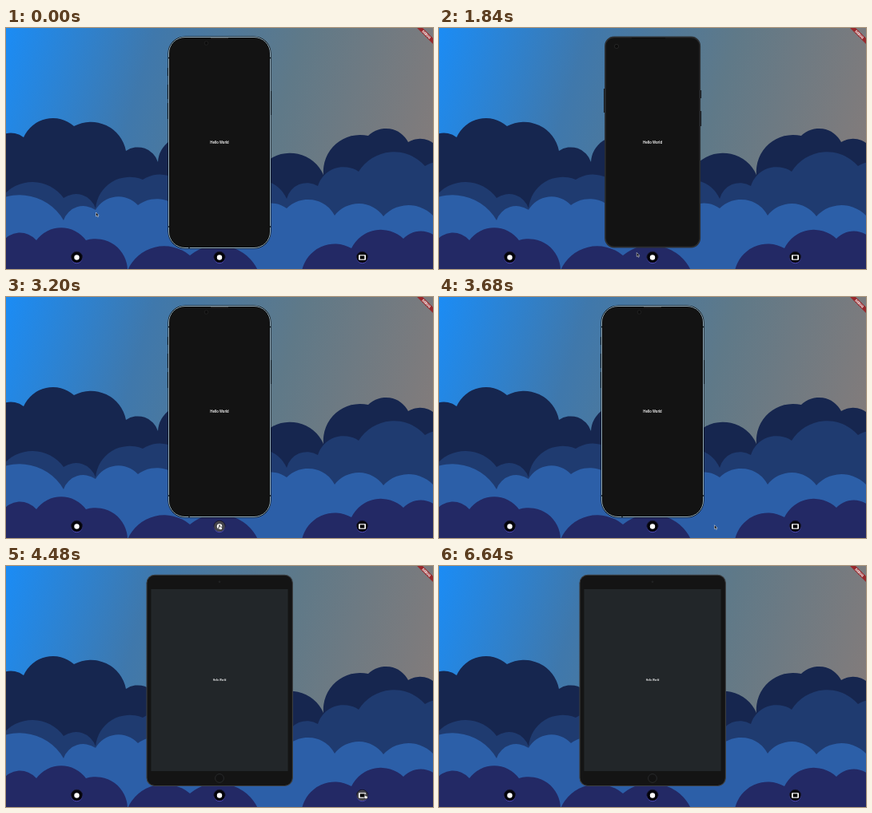
Recreate the animation shown at these times as an HTML page. Size 534 px wide and 302 px high, loop 7200 ms.

```html
<!DOCTYPE html>
<html lang="en">
<head>
<meta charset="utf-8">
<title>Device preview</title>
<style>
html, body { margin: 0; width: 100%; height: 100%; overflow: hidden; background: #232965; }
svg { display: block; width: 100vw; height: 100vh; }
text { font-family: Roboto, sans-serif; font-weight: 500; fill: #fff; text-anchor: middle; }
</style>
</head>
<body>
<svg viewBox="0 0 534 302" preserveAspectRatio="none">
  <defs>
    <linearGradient id="sky" gradientUnits="userSpaceOnUse" x1="0" y1="0" x2="573" y2="172">
      <stop offset="0" stop-color="#1b8cf5"/>
      <stop offset=".3" stop-color="#3f78ac"/>
      <stop offset=".6" stop-color="#5f7988"/>
      <stop offset="1" stop-color="#8a7c78"/>
    </linearGradient>
    <linearGradient id="rim" x1="0" y1="0" x2="0" y2="1">
      <stop offset=".4" stop-color="#15152e"/>
      <stop offset="1" stop-color="#5550c8"/>
    </linearGradient>
  </defs>
  <rect width="534" height="302" fill="url(#sky)"/>
  <g id="clouds"></g>

  <g id="phone">
    <path d="M202.4 50v10M202.4 71v18M202.4 94v20M331.6 79v30" stroke="#17202a"/>
    <rect x="203.5" y="11.5" width="127" height="264" rx="20.5" fill="#131313" stroke="#050505" stroke-width="2"/>
    <rect x="203.5" y="11.5" width="127" height="264" rx="20.5" fill="none" stroke="#94aebd"/>
    <path d="M203 37.5h1.2M330 37.5h1.2M203 249h1.2M330 249h1.2M229 275v1.2" stroke="#111820" stroke-width="1.4"/>
    <path d="M256 12.7h22" stroke="#343434" stroke-width="1.3"/>
    <circle cx="250.5" cy="19" r="2.3" fill="#0c0c0c" stroke="#292929" stroke-width=".7"/>
    <text x="267" y="145.2" font-size="4.5">Hello World</text>
  </g>

  <g id="slim">
    <path d="M206.7 76v30M327.4 78v10M327.4 104v19" stroke="#161a20" stroke-width="1.4"/>
    <rect x="207.9" y="11.4" width="118.4" height="263.2" rx="11" fill="#131313" stroke="#2c2e30" stroke-width="1.6"/>
    <path d="M241 12.8h42" stroke="#090909" stroke-width=".8"/>
    <circle cx="222" cy="23" r="2.6" fill="#0c0c0c" stroke="#2b2b2b" stroke-width=".8"/>
    <text x="267" y="144.8" font-size="4.65">Hello World</text>
  </g>

  <g id="tablet">
    <rect x="176" y="11.3" width="182.4" height="264.2" rx="10" fill="#141414" stroke="#3c3f42" stroke-width="1.1"/>
    <rect x="181.4" y="29" width="171.2" height="228" fill="#222629"/>
    <circle cx="267" cy="19.8" r="1" fill="#1b1d20" stroke="#2c2c2c" stroke-width=".5"/>
    <circle cx="267" cy="266" r="5.4" fill="#121212" stroke="#2e3032" stroke-width=".8"/>
    <text x="267" y="144.1" font-size="3.2">Hello World</text>
  </g>

  <g id="buttons"></g>

  <g transform="translate(525.8 8.2) rotate(45)">
    <rect x="-16" y="-2.5" width="32" height="5" fill="#a01418" fill-opacity=".8"/>
    <text y="1.5" font-size="4.2" style="font-weight:900">DEBUG</text>
  </g>

  <g id="cursor" stroke-linejoin="round">
    <path id="arrow" d="M0 0V5L1.2 4 2.1 5.9 3 5.5 2.1 3.7H3.6Z" fill="#000" stroke="#fff" stroke-width=".5"/>
    <path id="hand" d="M1 .4Q1.7 -.3 2.2 .5V2.3L4.6 2.9Q5.2 3.2 5 4.2L4.4 6.2H1.7L-.2 3.7Q0 2.9 1 3.6Z" fill="#fff" stroke="#000" stroke-width=".6"/>
  </g>
</svg>
<script>
const $ = id => document.getElementById(id);
const LOOP = 7200, STEP = 80, BUTTON_Y = 287.5;
const PUFF = 0.62; // arc radius relative to the gap between two valleys

// A cloud bank is a row of valleys joined by round puffs.
function bank(color, valleys) {
  const points = valleys.split(" ").map(p => p.split(",").map(Number));
  const arcs = points.slice(1).map(([x, y], i) => {
    const r = PUFF * Math.hypot(x - points[i][0], y - points[i][1]);
    return `A${r} ${r} 0 0 1 ${x} ${y}`;
  });
  return `<path fill="${color}" d="M${points[0]}${arcs.join("")}V350H${points[0][0]}Z"/>`;
}

$("clouds").innerHTML =
  bank("#16264f", "-18,148 22,137 85,123 150,154 190,168 235,138 325,168 397,184 453,135 503,143 545,160") +
  bank("#1f3b70", "-5,212 72,213 112,226 171,190 230,212 290,200 351,214 390,198 441,180 524,173 570,190") +
  bank("#2c5fa8", "-30,230 72,241 112,228 165,222 225,240 300,242 351,226 411,235 472,236 540,243") +
  bank("#232965", "-5,269 38,266 100,266 152,304 230,285 316,306 343,330 370,304 432,276 497,264 545,270");

const dot = '<circle r="3.2" fill="#fff"/>';
const frame = '<rect x="-4.5" y="-3.3" width="9" height="6.6" rx=".8" fill="#fff"/>' +
  '<rect x="-2.8" y="-2.1" width="5.6" height="4.2" fill="#000"/>';

// Pressing a button swaps the device a moment later.
const buttons = [
  { x: 88.5, icon: dot, press: 1040, device: "slim" },
  { x: 267, icon: dot, press: 2960, device: "phone" },
  { x: 445.5, icon: frame, press: 4320, device: "tablet" }
];
$("buttons").innerHTML = buttons.map(b => `<g transform="translate(${b.x} ${BUTTON_Y})">
  <circle r="7.2" fill="#02020a" stroke="url(#rim)" stroke-width=".9"/>
  <circle class="splash" r="6.8" fill="#fff"/>${b.icon}</g>`).join("");
const splashes = document.querySelectorAll(".splash");

const home = { x: 112.5, y: 231 };
const moves = [
  { from: 0, to: 800, x: 86.5, y: 288.5 },
  { from: 1600, to: 1920, x: 258, y: 281 },
  { from: 1920, to: 2640, x: 265.5, y: 285.5 },
  { from: 3520, to: 4160, x: 446, y: 286 },
  { from: 4400, to: 4720, x: 449, y: 285 },
  { from: 5520, to: 5760, x: 540, y: 272 }
];
const clamp = v => Math.max(0, Math.min(1, v));
const easeOut = u => 1 - (1 - u) ** 2;

function pointer(t) {
  let { x, y } = home;
  for (const m of moves) {
    const u = easeOut(clamp((t - m.from) / (m.to - m.from)));
    x += (m.x - x) * u;
    y += (m.y - y) * u;
  }
  return [x, y];
}

function show(id, on) {
  $(id).setAttribute("visibility", on ? "visible" : "hidden");
}

function draw(ms) {
  const t = Math.floor((ms % LOOP) / STEP) * STEP;
  const [x, y] = pointer(t);
  let device = "phone", over = false;
  buttons.forEach((b, i) => {
    const age = t - b.press;
    if (age >= 160) device = b.device;
    if (Math.hypot(x - b.x, y - BUTTON_Y) < 7.5) over = true;
    const glow = Math.min(clamp((age + 80) / 160), clamp((480 - age) / 240));
    splashes[i].setAttribute("opacity", glow * 0.27);
  });
  for (const id of ["phone", "slim", "tablet"]) show(id, id === device);
  show("arrow", !over);
  show("hand", over);
  $("cursor").setAttribute("transform", `translate(${x.toFixed(2)} ${y.toFixed(2)})`);
}

const start = performance.now();
function tick() {
  draw(performance.now() - start);
  requestAnimationFrame(tick);
}
tick();
</script>
</body>
</html>
```
